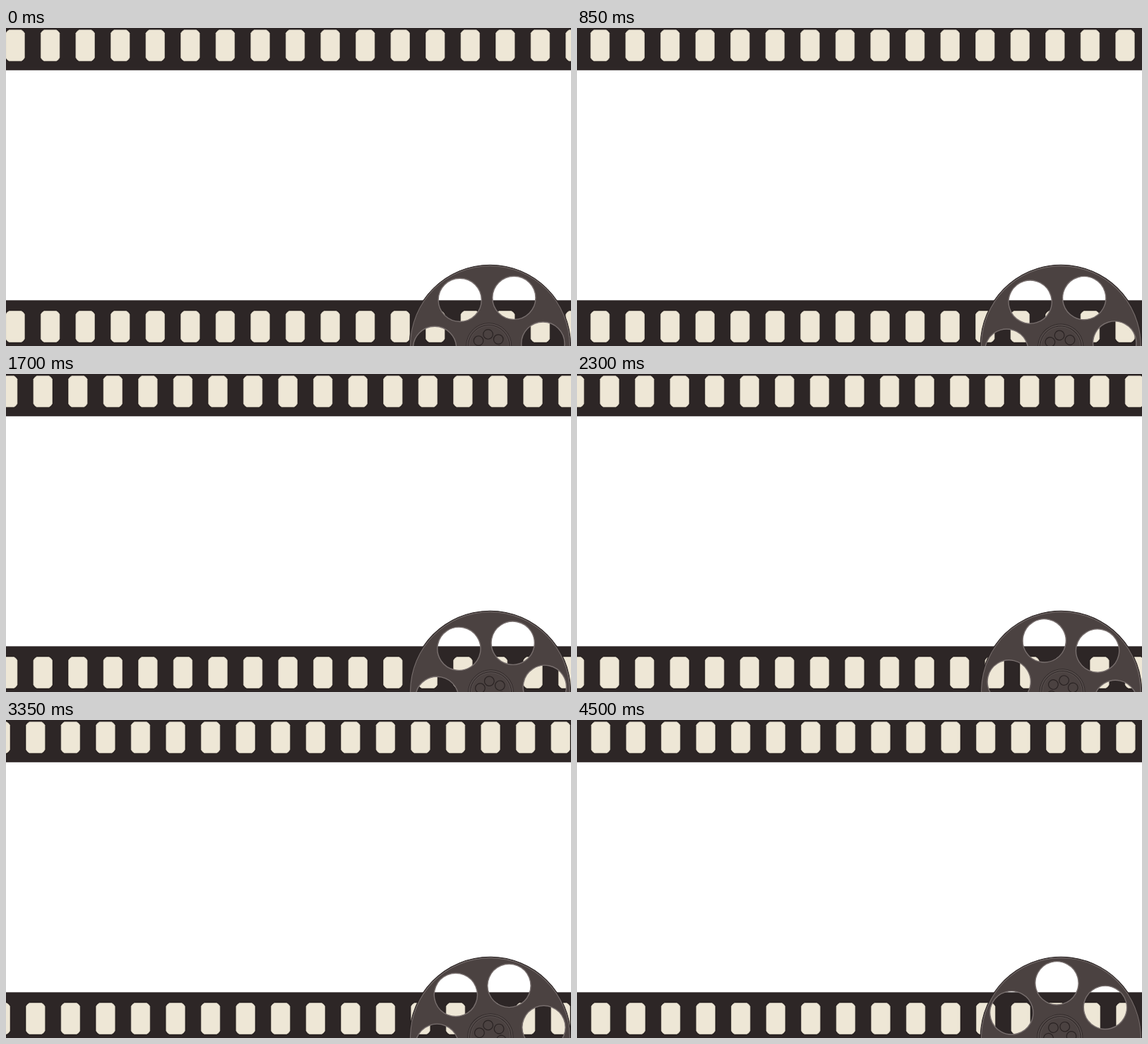
Write an HTML page with a canvas that moves like this. It is 800 px wide and 450 px high and loops after 4.55 s.

```html
<!DOCTYPE html>
<html>
<head>
<meta charset="utf-8">
<title>Film strip and reel</title>
<style>
  html, body { margin: 0; width: 100%; height: 100%; overflow: hidden; background: #fff; }
  canvas { display: block; }
</style>
</head>
<body>
<canvas id="stage" width="800" height="450"></canvas>
<script>
const ctx = document.getElementById('stage').getContext('2d');
const LOOP = 4550, STEP = 50;
const PITCH = 49.56, FILM_SPEED = 3.977;
const SPIN = 3.093 * Math.PI / 180;
const SIXTH = Math.PI / 3;

function stroke(path, color, width) {
  ctx.strokeStyle = color;
  ctx.lineWidth = width;
  ctx.stroke(path);
}

function circle(x, y, r) {
  const path = new Path2D();
  path.arc(x, y, r, 0, 2 * Math.PI);
  return path;
}

// Six circles around the origin; phase is measured clockwise from the top.
function sixCircles(radius, r, phase) {
  const path = new Path2D();
  for (let i = 0; i < 6; i++) {
    const a = phase * Math.PI / 180 + i * SIXTH;
    path.addPath(circle(radius * Math.sin(a), -radius * Math.cos(a), r));
  }
  return path;
}

// Rectangle with softly cut corners.
function perforation(w, h) {
  const c = 4.6, k = 1.5, path = new Path2D();
  path.moveTo(c, 0);
  path.lineTo(w - c, 0);
  path.quadraticCurveTo(w - k, k, w, c);
  path.lineTo(w, h - c);
  path.quadraticCurveTo(w - k, h - k, w - c, h);
  path.lineTo(c, h);
  path.quadraticCurveTo(k, h - k, 0, h - c);
  path.lineTo(0, c);
  path.quadraticCurveTo(k, k, c, 0);
  return path;
}

const hole = perforation(26.6, 44);
const windows = sixCircles(76.7, 30.6, -32.3);
const bolts = sixCircles(16.3, 6.8, -4);
const rim = circle(0, 0, 114.2);

function drawStrip(top, height, holeTop, shift) {
  ctx.fillStyle = '#2d2626';
  ctx.fillRect(0, top, 800, height);
  for (let x = shift - PITCH; x < 800; x += PITCH) {
    ctx.save();
    ctx.translate(x, holeTop);
    stroke(hole, '#1f1919', 2.4);
    ctx.fillStyle = '#eee7d6';
    ctx.fill(hole);
    stroke(hole, '#cfc7b8', 0.7);
    ctx.restore();
  }
}

function drawReel(angle) {
  ctx.save();
  ctx.translate(685.4, 449.5);
  ctx.rotate(angle);

  // The hub and windows sit slightly off the axis.
  const offset = new DOMMatrix().translate(-1.7, 0.2);
  const body = new Path2D(rim);
  body.addPath(windows, offset);
  ctx.fillStyle = '#4b4241';
  ctx.fill(body, 'evenodd');
  stroke(circle(0, 0, 112.8), '#776e6d', 0.9);
  stroke(rim, '#2a2323', 1);

  ctx.translate(-1.7, 0.2);
  stroke(windows, '#776e6d', 1.4);
  for (const r of [32, 29]) {
    stroke(circle(0, 0, r), '#2f2828', 0.9);
    stroke(circle(0, 0, r - 0.9), '#635a59', 0.6);
  }
  stroke(bolts, '#2a2323', 1.2);
  ctx.restore();
}

function draw(now) {
  const tick = Math.floor(now % LOOP / STEP);
  // The motion advances in 23.976 fps steps, shown every 50 ms.
  const k = Math.max(0, Math.floor(tick * 1.1988 - 0.17));
  const shift = ((49.3 - FILM_SPEED * k) % PITCH + PITCH) % PITCH;

  ctx.fillStyle = '#fff';
  ctx.fillRect(0, 0, 800, 450);
  drawStrip(0, 59.8, 2.7, shift);
  drawStrip(385.3, 64.7, 400.5, shift);
  drawReel(-SPIN * k);
}

const start = performance.now();
function frame() {
  draw(performance.now() - start);
  requestAnimationFrame(frame);
}
frame();
</script>
</body>
</html>
```
